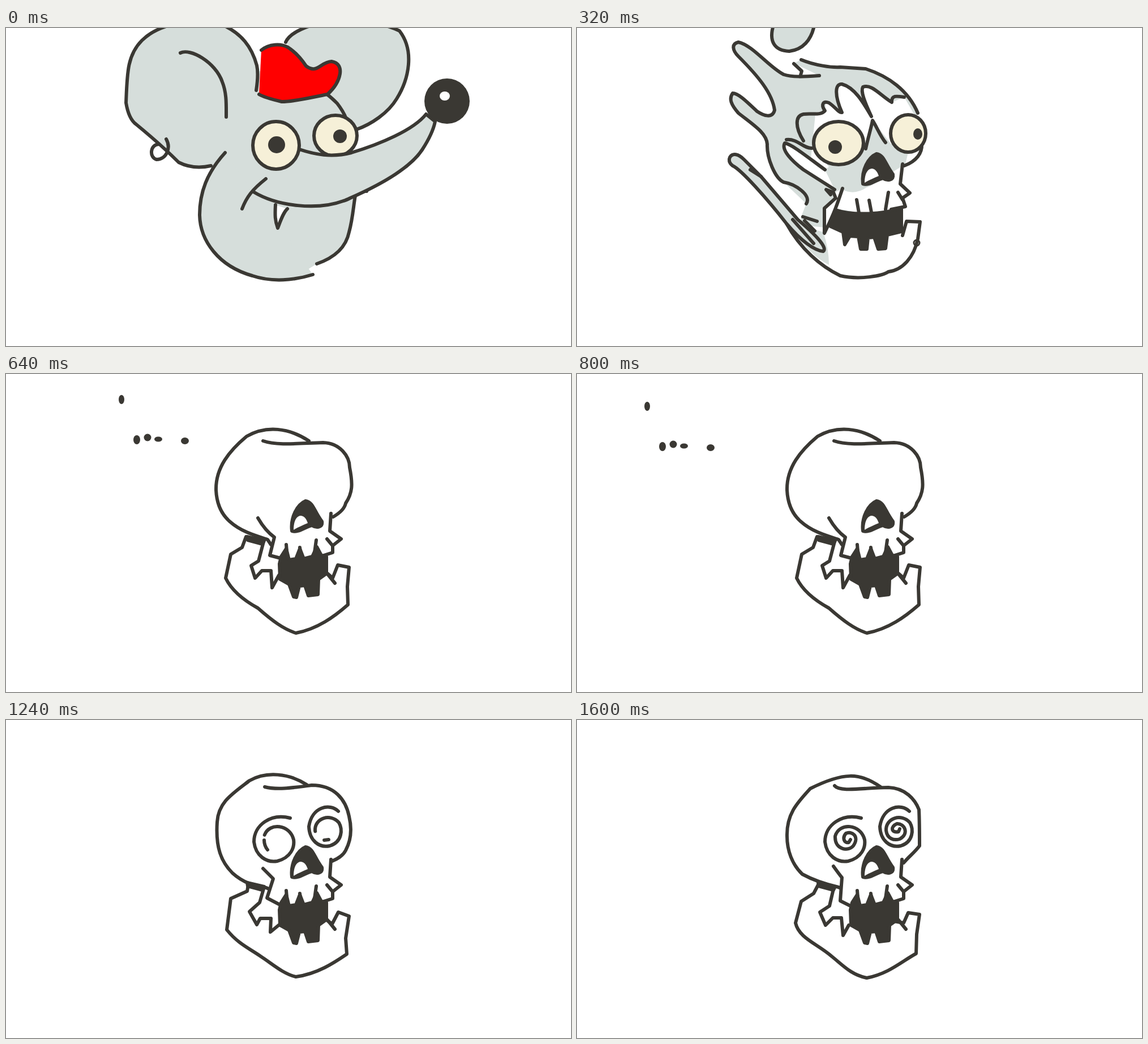
An HTML page without scripts that plays this animation: 998 by 561 pixels, repeating every 1.64 s.

```html
<!DOCTYPE html>
<html lang="en">
<head>
<meta charset="utf-8">
<title>Wind blast</title>
<style>
html, body { margin: 0; width: 100%; height: 100%; overflow: hidden; background: #fff; }
svg { display: block; width: 100vw; height: 100vh; }
svg { --ink: #3a3833; --skin: #d6dedb; --bone: #fff; --cream: #f6f0d8; }
path, ellipse, circle { fill: none; stroke: var(--ink); stroke-width: 6; stroke-linecap: round; stroke-linejoin: round; }
.skin { fill: var(--skin); }
.bone { fill: var(--bone); }
.cream { fill: var(--cream); }
.ink { fill: var(--ink); }
.red { fill: #f00; }
.bare { stroke: none; }
.thin { stroke-width: 3; }

/* poses, each cut in hard */
.pose, .cut { animation: 1640ms step-end infinite; }
.rat { animation-name: rat; }
.melt { animation-name: melt; }
.strip { animation-name: strip; }
.skull { animation-name: skull; }
.shut { animation-name: shut; }
.open { animation-name: open; }
@keyframes rat { 0% { visibility: visible } 14.63%, 100% { visibility: hidden } }
@keyframes melt { 0% { visibility: hidden } 14.63% { visibility: visible } 24.38%, 100% { visibility: hidden } }
@keyframes strip { 0% { visibility: hidden } 24.38% { visibility: visible } 36.58%, 100% { visibility: hidden } }
@keyframes skull { 0% { visibility: hidden } 36.58%, 100% { visibility: visible } }
@keyframes shut { 0% { opacity: 1 } 4.87%, 100% { opacity: 0 } }
@keyframes open { 0% { opacity: 0 } 4.87%, 100% { opacity: 1 } }

/* shapes bending between drawn poses */
.bend { d: var(--a); animation: bend 1640ms infinite; }
@keyframes bend {
  0% { d: var(--a); animation-timing-function: steps(4) }
  9.75%, 100% { d: var(--b) }
}
.far { animation: bend 1640ms infinite, far 1640ms step-end infinite; }
@keyframes far { 0% { stroke: var(--ink) } 7.31%, 100% { stroke: var(--skin) } }
.wobble { d: var(--a); animation: wobble 1640ms infinite; }
@keyframes wobble {
  0%, 48.77% { d: var(--a); animation-timing-function: steps(11) }
  75.6% { d: var(--b); animation-timing-function: steps(9) }
  97.55%, 100% { d: var(--c) }
}

/* loose parts */
.nose { animation: nose 1640ms infinite; }
@keyframes nose {
  0% { transform: translate(779px, 129px); animation-timing-function: steps(4) }
  9.75%, 100% { transform: translate(574px, 19px) scale(.82) }
}
.shine { animation: shine 1640ms infinite; }
@keyframes shine {
  0% { transform: translate(-4px, -9px); animation-timing-function: steps(4) }
  9.75%, 100% { transform: translate(-11px, -2px) rotate(20deg) scale(1.25, 1.6) }
}
.eye { animation: eye 1640ms infinite; }
@keyframes eye {
  0% { transform: translate(477px, 207px); animation-timing-function: steps(4) }
  9.75%, 100% { transform: translate(475px, 205px) scale(.92, .96) }
}
.chunk { animation: chunk 1640ms infinite; }
@keyframes chunk {
  0%, 14.63% { transform: translate(50px, -20px); animation-timing-function: steps(2) }
  19.51% { transform: none; animation-timing-function: steps(2) }
  24.38%, 100% { transform: translate(-50px, 20px) }
}
.fly { animation: fly 1640ms infinite; }
@keyframes fly {
  0%, 24.38% { transform: translate(36px, -8px); animation-timing-function: steps(2) }
  29.26% { transform: none; animation-timing-function: steps(3) }
  36.58%, 100% { transform: translate(-150px, -30px) }
}
.dots { animation: dots 1640ms infinite, gone 1640ms step-end infinite; }
@keyframes dots {
  0%, 36.58% { transform: translate(100px, -15px); animation-timing-function: steps(5) }
  48.77% { transform: none; animation-timing-function: steps(9) }
  70.73%, 100% { transform: translate(-52px, 25px) }
}
@keyframes gone { 0% { opacity: 1 } 73.16%, 100% { opacity: 0 } }
.spiral { stroke-dasharray: 1 2; animation: spiral 1640ms infinite; }
@keyframes spiral {
  0% { visibility: hidden; stroke-dashoffset: 1; animation-timing-function: step-end }
  56.09% { visibility: visible; stroke-dashoffset: .96; animation-timing-function: steps(8) }
  75.6% { visibility: visible; stroke-dashoffset: .3; animation-timing-function: steps(9) }
  97.55%, 100% { visibility: visible; stroke-dashoffset: 0 }
}
.glint { animation: glint 1640ms step-end infinite; }
@keyframes glint { 0% { visibility: hidden } 73.16% { visibility: visible } 78.04%, 100% { visibility: hidden } }
</style>
</head>
<body>
<svg viewBox="0 0 998 561" preserveAspectRatio="none">
<defs>
  <g id="nostril">
    <path class="ink" d="M505 277C502 252 515 230 529 224C543 226 544 242 558 260C560 271 548 272 540 267C528 270 515 281 505 277Z"/>
    <path class="bone bare" d="M508 275C508 258 514 250 521 250C528 251 531 257 533 263C524 267 516 270 508 275Z"/>
  </g>
</defs>

<g class="pose rat">
  <path class="skin bend far" style="--a:path('M494 25C510 -10 620 -30 695 5C722 40 712 90 690 125C675 150 645 170 619 179');--b:path('M376 43C350 12 330 -5 300 -20C430 -20 455 25 480 70C470 76 460 78 440 80')"/>
  <path class="skin bare" d="M362 245L385 130L437 78C470 70 520 75 550 88C575 100 595 120 602 155L612 222L578 264L580 310L512 430L435 430L358 330Z"/>
  <path class="skin bare bend" style="--a:path('M480 300L520 434L549 416C575 407 600 390 606 360C613 335 614 310 617 296Z');--b:path('M480 300L512 437L512 437C550 425 595 400 602 380C609 355 605 332 587 313Z')"/>
  <path class="skin bend" style="--a:path('M442 110C445 90 445 75 443 66C436 40 420 5 365 -12C310 -15 265 -3 240 22C214 48 214 80 212 132C215 150 220 163 230 170C258 193 285 217 305 237C325 247 345 247 362 243L362 243');--b:path('M407 98C397 80 385 60 373 45C355 27 340 8 315 -5C270 -20 150 -20 103 -2C75 28 78 60 81 110C84 130 90 141 100 146C130 162 180 160 205 175C255 215 290 258 330 261L362 258')"/>
  <path class="bend" style="--a:path('M308 44C325 35 370 60 382 95C390 115 389 135 389 157');--b:path('M127 47C190 10 230 20 295 24C345 30 363 95 379 129')"/>
  <path class="bend" style="--a:path('M283 196C292 212 283 232 266 232C252 228 255 205 270 205');--b:path('M157 141C161 160 145 172 128 179C122 168 127 152 137 151')"/>
  <path class="skin bend" style="--a:path('M387 220C355 255 342 290 342 330C343 375 375 420 435 437C470 449 510 445 542 435');--b:path('M360 246C348 268 352 300 358 325C370 380 395 415 445 431C470 440 495 438 512 437')"/>
  <path class="bend" style="--a:path('M549 416C575 407 600 390 606 360C613 335 614 310 617 296');--b:path('M512 437C550 425 595 400 602 380C609 355 605 332 587 313')"/>
  <path class="bend" style="--a:path('M567 117C575 123 580 128 585 133C592 142 597 150 601 160');--b:path('M437 76C470 68 520 75 550 88C575 100 588 115 595 128')"/>
  <path class="red bend" style="--a:path('M451 39C465 28 485 27 498 34C512 43 522 55 530 67C550 82 555 60 575 59C600 63 592 95 568 117C540 122 510 130 487 130C470 126 455 122 447 117');--b:path('M376 43C385 35 392 30 396 22C395 15 392 5 389 -5C400 -8 410 -8 415 -5C422 20 430 50 437 80C432 88 425 93 420 94C415 96 410 97 407 97')"/>
  <ellipse class="cream" cx="582" cy="190" rx="38" ry="36"/>
  <circle class="ink bare" cx="590" cy="191" r="12"/>
  <path class="skin bend" style="--a:path('M518 214C545 223 575 229 610 220C660 205 720 180 742 152L758 165C755 180 748 195 735 215C715 245 665 275 608 300C604 302 600 304 596 305C550 322 480 315 437 289');--b:path('M522 195C560 195 595 160 602 120C612 90 605 60 598 42L606 18C640 45 660 100 668 152C665 190 625 240 578 264C580 275 584 283 588 291C550 303 480 300 437 283')"/>
  <ellipse class="cream eye" rx="41" ry="42"/>
  <circle class="ink bare" cx="478" cy="206" r="15"/>
  <g class="nose">
    <circle class="ink bare" r="40"/>
    <ellipse class="bone bare shine" rx="9" ry="8"/>
  </g>
  <g class="cut shut">
    <path d="M459 266C435 285 425 298 417 319M636 288h1"/>
    <path class="bone" d="M476 312C475 330 475 340 480 353C485 340 490 325 497 319"/>
  </g>
  <g class="cut open">
    <path class="ink" d="M438 282C445 315 480 345 530 355L587 354L576 320L572 300C530 304 470 300 438 282Z"/>
    <path class="bone bare" d="M469 300Q520 307 572 301L580 306L573 320L553 318L545 327L524 322L515 329L495 324L485 328Q470 322 469 300ZM504 346L524 342L522 351ZM545 353L558 346L559 353Z"/>
    <path class="ink thin" d="M491 328L495 312L502 328ZM519 328L522 318L529 328ZM544 328L549 314L554 328ZM569 320L572 305"/>
    <path class="bone bare" d="M654 98L675 96L675 148L662 144L645 122Z"/>
    <path class="ink" d="M613 122L650 98L646 110L640 122Z"/>
    <path d="M651 92L655 87L657 107L665 112M613 122L640 132L665 136M640 132L662 143M595 112L604 122"/>
    <path class="bone" d="M522 405L546 405L537 414L548 419L540 429M535 412C520 424 490 420 475 420C470 426 485 432 500 430C518 430 530 424 540 418"/>
  </g>
</g>

<g class="pose melt">
  <path class="skin chunk" d="M347 -5C338 25 350 40 375 41C400 38 413 20 418 0"/>
  <path class="skin bare" d="M428 84L383 62L396 56Q430 70 510 72C550 85 585 110 602 150L580 240L500 290L445 410L420 410L395 335L405 310L365 272L336 205L349 145L365 82Z"/>
  <path class="bone bare" d="M415 212L400 199C385 175 385 155 400 152L438 146L440 131L468 149C455 120 455 98 468 99Q490 105 520 156Q500 115 505 104C520 98 535 118 556 131L578 122L600 160L555 205L522 163L510 213Z"/>
  <path class="bone bare" d="M370 198Q400 197 418 214L445 245L438 250Z"/>
  <path class="skin" d="M428 84C400 86 380 87 365 82C340 70 310 30 285 25C272 28 275 40 285 50C320 85 345 115 349 145C345 160 330 155 318 147C300 130 285 115 275 115C268 125 272 135 285 150C310 170 335 185 336 205C335 230 350 265 365 272C385 275 415 295 405 310"/>
  <path d="M383 63L397 76L395 83M396 56C420 66 450 70 465 69L510 72C550 85 585 110 602 150"/>
  <path d="M400 199C385 175 385 155 400 152C415 150 430 155 438 146C430 135 435 128 445 132C455 138 462 150 468 149C455 120 455 98 468 99C490 105 505 130 520 156C510 135 500 112 505 104C520 98 535 118 556 131C555 118 565 120 578 122M510 213C515 190 520 175 522 163C530 175 535 190 545 202"/>
  <path class="bone" d="M438 250C410 230 380 205 367 203C360 215 380 235 400 250L455 285"/>
  <path d="M370 197C390 195 400 213 415 212"/>
  <path class="bone" d="M370 345C395 390 430 420 465 437C500 445 540 437 550 430C575 427 595 405 602 372L606 342L582 341L575 366"/>
  <path class="skin bare" d="M380 345L435 360Q445 390 445 418Q410 400 380 355Z"/>
  <path class="skin" d="M270 228C275 220 285 222 295 232L325 262L390 338C437 378 440 390 435 394C420 393 395 375 370 345C335 300 290 250 275 243C268 238 268 232 270 228Z"/>
  <path d="M306 250L325 262M381 338L418 380M399 333L424 341M402 340L420 358"/>
  <path class="bone" d="M578 243C600 235 610 220 609 205"/>
  <path class="bone bare" d="M469 285Q490 296 512 281L575 262L588 291L580 315L520 328L450 318Z"/>
  <path class="ink" d="M457 321C490 332 540 328 573 318L573 359L548 365L545 389L532 390L525 369L514 370L512 390L501 390L497 368L482 367L473 382L470 360L448 350Z"/>
  <path class="bone" d="M469 283C460 310 455 325 437 362L437 318L457 300L453 290L440 285L448 294"/>
  <path d="M494 303L498 326M516 304L520 325M550 290L545 320M575 240L571 275L588 291L575 300L580 315L555 320M567 290L575 303"/>
  <ellipse class="cream" cx="462" cy="203" rx="44" ry="38"/>
  <circle class="ink bare" cx="456" cy="210" r="12"/>
  <ellipse class="cream" cx="585" cy="186" rx="31" ry="33"/>
  <ellipse class="ink bare" cx="602" cy="187" rx="8" ry="10"/>
  <use href="#nostril" y="-2"/>
  <circle class="thin" cx="600" cy="379" r="5"/>
</g>

<g class="pose strip">
  <g class="fly">
    <path class="skin" d="M268 65C262 75 250 72 246 82C248 100 260 104 270 102C280 90 290 80 285 65"/>
    <circle class="ink bare" cx="273" cy="47" r="17"/>
    <path d="M233 23C222 35 222 55 230 71M212 53C212 65 215 75 218 83M217 188L229 199M273 230L294 247"/>
  </g>
  <g class="fly">
    <path class="cream" d="M606 148C625 140 642 150 640 170C637 195 625 208 613 206"/>
    <ellipse class="ink bare" cx="635" cy="165" rx="6" ry="10"/>
  </g>
  <path class="bone bare" d="M358 213C360 160 400 100 470 80L580 112C600 130 615 210 570 250L580 300L468 290L390 239Z"/>
  <path class="skin bare" d="M510 76Q555 72 583 96L580 112Z"/>
  <path class="skin" d="M317 128C340 135 365 128 385 115C410 98 440 88 470 92C490 95 495 105 508 112C515 108 510 98 497 88L515 88C550 100 575 122 580 112C565 98 540 84 510 76C470 70 440 70 436 76C436 82 442 82 446 81"/>
  <path class="skin" d="M365 125C345 140 360 155 350 165C335 175 325 195 342 209L358 213C360 175 380 140 405 122C430 105 450 102 465 103"/>
  <path class="skin bare" d="M365 125Q410 90 470 92L465 103L405 122Z"/>
  <path d="M580 112C600 130 605 155 608 180C615 210 595 240 572 250M390 135C420 105 465 130 480 164M471 171h.5"/>
  <path class="bone" d="M427 285C425 300 418 308 400 314C385 330 388 350 390 365C415 395 455 415 495 449C530 457 560 440 603 415C610 400 605 385 602 370L607 350C600 342 585 340 580 345L577 370L565 355L470 350C460 350 445 350 433 362L433 335C448 325 450 310 452 292"/>
  <path class="ink" d="M415 274L466 288L445 297L427 288Z"/>
  <path class="skin" d="M342 222C335 235 350 255 365 262C400 260 430 275 470 287C455 270 440 245 390 239C370 240 355 225 342 222Z"/>
  <path class="skin" d="M314 278C320 272 345 285 350 295C380 320 405 345 412 362C400 365 380 340 352 312C330 310 318 295 314 278Z"/>
  <path d="M285 207L403 321M350 298L370 320"/>
  <path class="skin bare" d="M477 250L520 238L505 272L487 264Z"/>
  <path class="ink" d="M470 333L490 330L497 318L502 330L545 328L551 310L566 328L567 352L553 365Q550 392 542 393Q534 388 528 375Q516 398 505 394L500 370L485 367Q480 384 471 382Z"/>
  <path d="M475 250L487 262L468 280C465 300 462 318 467 323L482 328M494 301L500 322M518 305L520 326M547 291L548 310M575 242L570 275L588 293L578 305L581 315L568 325M566 290L577 304"/>
  <path class="ink" d="M510 240L535 224L546 232L572 243L556 258Z"/>
  <use href="#nostril"/>
  <g class="fly">
    <circle class="cream" cx="389" cy="208" r="31"/>
    <ellipse class="ink bare" cx="364" cy="210" rx="8" ry="12"/>
  </g>
</g>

<g class="pose skull">
  <path class="wobble" style="--a:path('M424 287L417 306L397 318L388 360C400 385 425 402 445 413C470 435 490 450 512 457C550 450 580 428 604 407L603 375L606 341L586 337L577 360L568 352');--b:path('M428 290L426 302L397 315L390 370C410 395 430 403 450 417C470 430 490 448 512 453C550 448 580 428 602 413L600 385L606 346L587 339L576 360L568 354');--c:path('M428 287L418 306L396 320L386 358C392 385 425 395 450 417C470 433 485 450 512 455C550 448 575 425 599 412L600 378L605 343L585 340L577 358L560 355')"/>
  <path class="wobble" style="--a:path('M456 292L446 330L433 338L440 360L452 347L468 347L470 377L482 355');--b:path('M455 298L448 322L430 338L443 361L449 350L468 350L467 374L484 360');--c:path('M453 298L446 328L429 339L439 362L452 349L467 349L470 380L480 362')"/>
  <path class="ink" d="M426 287L456 294L453 300L427 293Z"/>
  <path class="wobble" style="--a:path('M535 118C500 95 460 90 425 110C395 135 370 165 371 205C372 225 378 245 395 260C415 278 440 285 462 292L468 301');--b:path('M531 114C500 94 460 90 430 107C400 130 375 145 373 180C370 225 380 250 400 270C420 288 440 293 460 296L462 297');--c:path('M536 118C500 92 470 92 412 121C390 145 370 165 371 205C371 230 380 255 398 272C420 284 440 290 462 295L464 296')"/>
  <path class="wobble" style="--a:path('M454 118C480 127 520 122 560 121C590 122 607 145 607 165C613 195 612 210 600 228C598 238 590 245 578 252');--b:path('M457 118C480 124 510 119 540 115C580 115 600 140 606 170C612 195 608 215 600 230C595 240 585 245 576 249');--c:path('M455 116C465 128 510 119 550 119C580 120 597 140 604 158C605 180 605 200 605 222C597 233 585 242 577 252')"/>
  <path class="wobble" style="--a:path('M445 254C453 268 463 280 474 288L466 320L485 325');--b:path('M454 262C460 268 466 274 472 280L461 314L484 326');--c:path('M453 258C458 265 463 272 468 278L465 319L485 329')"/>
  <path class="ink" d="M486 322L495 308L500 328L512 326L519 308L526 326L541 322L549 305L557 320L566 322L566 352L552 362L551 389L534 391L528 373L518 374L513 394L508 393L500 371L484 362L483 335Z"/>
  <path d="M495 301L497 325M519 306L521 324M548 293L545 315M574 246L572 277L592 291L578 302M567 291L577 303L577 315L558 321M568 353L581 369"/>
  <use href="#nostril"/>
  <path class="spiral" pathLength="1" d="M502 173C468 164 438 185 438 215C441 240 460 252 479 249C503 243 510 225 508 211C501 183 463 180 456 205C455 230 480 232 488 222C500 205 485 195 475 200C468 208 472 218 480 216L483 211"/>
  <path class="spiral" pathLength="1" d="M587 161C572 146 540 153 535 188C536 213 553 226 572 222C594 215 595 193 588 181C573 164 545 173 546 195C548 210 560 213 570 210C588 200 578 182 565 183C553 188 555 200 568 197L570 192"/>
  <path class="glint" d="M456 212C456 218 458 224 462 229M562 212L570 211"/>
  <g class="dots">
    <ellipse class="ink bare" cx="124" cy="57" rx="5" ry="8"/>
    <ellipse class="ink bare" cx="151" cy="128" rx="6" ry="8"/>
    <circle class="ink bare" cx="170" cy="124" r="6.5"/>
    <ellipse class="ink bare" cx="189" cy="127" rx="7" ry="4.5"/>
    <ellipse class="ink bare" cx="236" cy="130" rx="7" ry="6"/>
  </g>
</g>
</svg>
</body>
</html>
```
